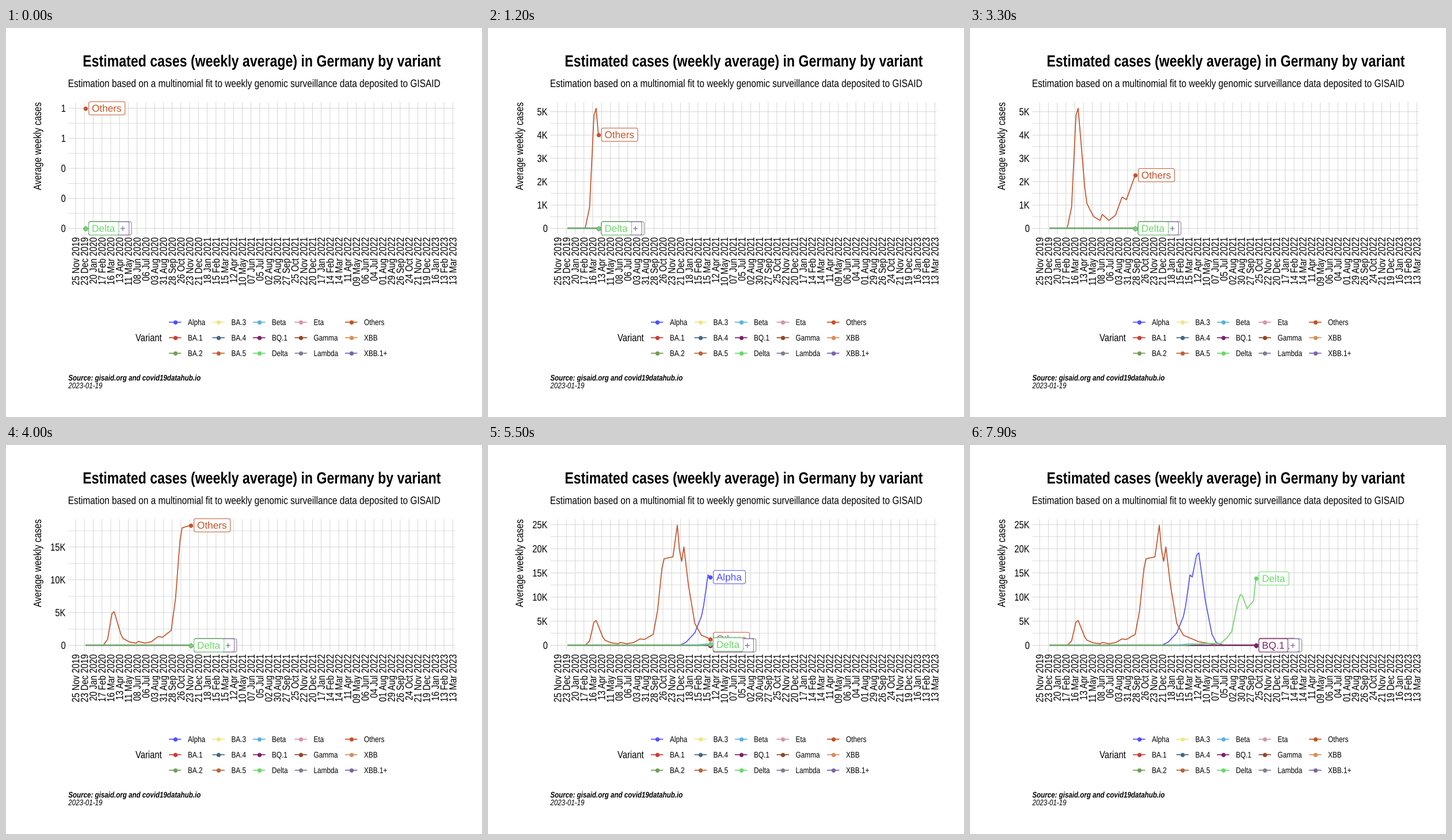
Recreate the animation shown at these times as a matplotlib script. Size 827x677 px, loop 8 s.

```python
import numpy as np
import matplotlib.pyplot as plt
from matplotlib.animation import FuncAnimation
from matplotlib.patches import FancyBboxPatch, PathPatch
from matplotlib.textpath import TextPath
from matplotlib.transforms import Affine2D

W, H, DPI = 827, 677, 64
PX = 72 / DPI                      # points per pixel
FRAMES, STEP_MS = 80, 100
WEEKS_PER_FRAME = 1.188
WEEKS = np.arange(96)

LEFT, RIGHT, TOP, BOTTOM = 108.3, 779.8, 129.2, 359.2
X0, WEEK = 138.4, 3.81             # first data point, pixels per week
Y0, SPAN = 348.7, 209              # zero line, height of the running maximum
NARROW = 0.82                      # condensed face
GRID = "#cccccc"

COLORS = {
    "Alpha": "#5050FF", "BA.1": "#CE3D32", "BA.2": "#749B58",
    "BA.3": "#F0E685", "BA.4": "#466983", "BA.5": "#BA6338",
    "Beta": "#5DB1DD", "BQ.1": "#802268", "Delta": "#6BD76B",
    "Eta": "#D595A7", "Gamma": "#924822", "Lambda": "#837B8D",
    "Others": "#C75127", "XBB": "#D58F5C", "XBB.1+": "#7A65A5",
}
STACK = ["Alpha", "Others", "BA.1", "BA.2", "BA.3", "BA.4", "BA.5", "Eta",
         "Gamma", "Lambda", "XBB", "XBB.1+", "Beta", "BQ.1", "Delta"]


def curve(*turns):
    """Weekly cases running straight between (week, cases) turning points."""
    return np.interp(WEEKS, *zip(*turns))


cases = {name: np.zeros(len(WEEKS)) for name in COLORS}
cases["Others"] = curve(
    (7, 1), (8, 10), (10, 910), (12, 4850), (13, 5148), (16, 1750),
    (17, 1060), (20, 510), (23, 340), (24, 600), (27, 340), (30, 560),
    (33, 1340), (35, 1230), (39, 2280), (41, 7190), (43, 15960), (44, 17950),
    (48, 18333), (50, 24881), (51, 19700), (52, 17400), (53, 20400),
    (55, 12700), (58, 4500), (61, 2100), (68, 750), (76, 120))
cases["Alpha"] = curve(
    (51, 0), (54, 650), (58, 2600), (61, 6000), (62, 8200), (64, 14600),
    (65, 14150), (67, 18700), (68, 19150), (71, 9200), (74, 2300), (76, 550),
    (80, 0))
cases["Delta"] = curve(
    (61, 0), (70, 380), (78, 400), (81, 1650), (83, 2850), (86, 9400),
    (87, 10550), (88, 10150), (90, 7600), (93, 9250), (94, 13850))
cases["Beta"] = 290 * np.exp(-((WEEKS - 65) / 6) ** 2)
peak = np.maximum.accumulate(np.max(list(cases.values()), axis=0))

fig = plt.figure(figsize=(W / DPI, H / DPI), dpi=DPI, facecolor="white")
ax = fig.add_axes([0, 0, 1, 1])
ax.set_xlim(0, W)
ax.set_ylim(H, 0)
ax.axis("off")


def text(s, x, y, size, anchor=0, turn=0, squeeze=NARROW, color="black",
         z=3, **font):
    """Add text on baseline y; anchor 0, 0.5, 1 is left, centre, right."""
    raw = TextPath((0, 0), s, size=size,
                   prop=dict(family="Liberation Sans", **font))
    width = raw.get_extents().x1
    place = (Affine2D().translate(-anchor * width, 0).scale(squeeze, -1)
             .rotate_deg(turn).translate(x, y))
    patch = PathPatch(raw.transformed(place), fc=color, lw=0, zorder=z)
    ax.add_patch(patch)
    return patch, width * squeeze


def line(xs, ys, color, width, z):
    return ax.plot(xs, ys, color=color, lw=width * PX, zorder=z, snap=False,
                   solid_capstyle="butt", solid_joinstyle="round")[0]


def dot(x, y, color, z):
    return ax.plot([x], [y], "o", ms=7.4 * PX, color=color, mew=0,
                   zorder=z, snap=False)[0]


def draw_static():
    text("Estimated cases (weekly average) in Germany by variant",
         444.2, 67, 28.2, anchor=0.5, weight="bold")
    text("Estimation based on a multinomial fit to weekly genomic "
         "surveillance data deposited to GISAID", LEFT - 0.6, 102.7, 18.8)
    text("Average weekly cases", 61, TOP + 0.5, 18.8, anchor=1, turn=-90)
    text("Source: gisaid.org and covid19datahub.io", LEFT, 613.5, 14.1,
         weight="bold", style="italic")
    text("2023-01-19", LEFT, 627, 14.1, style="italic")

    first = np.datetime64("2019-11-25")
    for i in range(44):
        x = X0 + (4 * i - 32 / 7) * WEEK
        line([x, x], [TOP, BOTTOM], GRID, 0.8, 1)
        day = (first + 28 * i).astype(object)
        text(day.strftime("%d %b %Y"), x + 6.2, 364.8, 18, anchor=1, turn=-90)

    text("Variant", 225, 545, 18)
    columns = [293.7, 369.2, 439.7, 512.2, 599.7]
    for i, (name, color) in enumerate(COLORS.items()):
        x, y = columns[i // 3], 512 + 27 * (i % 3)
        line([x - 10.7, x + 10.7], [y, y], color, 1.67, 3)
        dot(x, y, color, 4)
        text(name, x + 22.3, y + 5, 14.4)


def make_tag(name, z):
    """Rounded label whose anchor point is the origin."""
    color = COLORS[name]
    glyphs, width = text(name, 10.7, 5.9, 17.2, squeeze=1, color=color,
                         z=z + 0.01)
    box = FancyBboxPatch((5.4, -11.5), width + 12, 23, fc="white", ec=color,
                         boxstyle="round,pad=0,rounding_size=3.2",
                         lw=1.0 * PX, zorder=z)
    ax.add_patch(box)
    return box, glyphs


def tick_step(top):
    """Pick the tick step by simplicity, coverage and density."""
    best, choice = -np.inf, top
    base = int(np.floor(np.log10(top)))
    for power in (base - 1, base):
        for rank, q in enumerate((1, 5, 2, 2.5, 4, 3)):
            step = q * 10.0 ** power
            for n in range(2, 10):
                last = step * (n - 1)
                cover = 1 - 0.5 * ((top - last) / (0.1 * top)) ** 2
                ratio = (n - 1) / last * max(last, top) / 4
                score = (0.25 * (1 - rank / 5) + 0.2 * cover
                         + 0.5 * (2 - max(ratio, 1 / ratio)))
                if score > best + 1e-9:
                    best, choice = score, step
    return choice


def tick_label(v):
    return f"{v / 1000:.0f}K" if v >= 1000 else f"{v:.0f}"


draw_static()
curves, dots, tags = {}, {}, {}
for i, name in enumerate(STACK):
    curves[name] = line([], [], COLORS[name], 1.67, 5 + i / 100)
    dots[name] = dot(X0, Y0, COLORS[name], 6 + i / 100)
    tags[name] = make_tag(name, 7 + i)
axis_parts = []


def draw_axis(top):
    while axis_parts:
        axis_parts.pop().remove()
    half = tick_step(top) / 2
    for i in range(int(top * 1.05 / half) + 1):
        y = Y0 - SPAN * i * half / top
        major = i % 2 == 0
        axis_parts.append(line([LEFT, RIGHT], [y, y], GRID,
                               0.8 if major else 0.65, 1))
        if major:
            axis_parts.append(
                text(tick_label(i * half), 103.2, y + 6.2, 18, anchor=1)[0])


def update(k):
    week = int(round(k * WEEKS_PER_FRAME))
    top = peak[week]
    draw_axis(top)
    xs = X0 + WEEK * WEEKS[:week + 1]
    for name in STACK:
        ys = Y0 - SPAN * cases[name][:week + 1] / top
        curves[name].set_data(xs, ys)
        dots[name].set_data(xs[-1:], ys[-1:])
        shift = Affine2D().translate(xs[-1], ys[-1]) + ax.transData
        for part in tags[name]:
            part.set_transform(shift)
    return []


anim = FuncAnimation(fig, update, frames=FRAMES, interval=STEP_MS,
                     init_func=lambda: update(0), repeat=True, repeat_delay=0)
plt.show()
```
